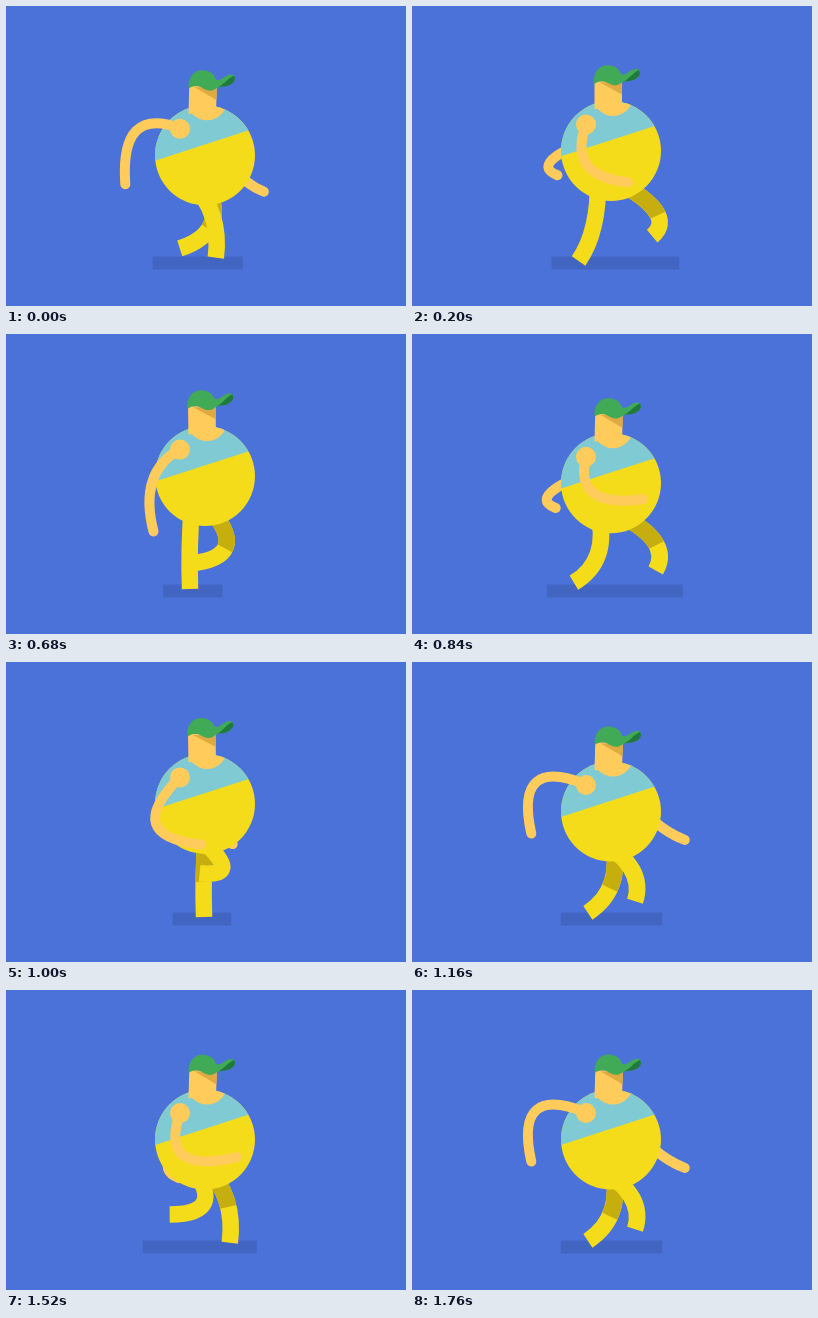
Write an HTML page with a canvas that moves like this. It is 400 px wide and 300 px high and loops after 1800 ms.

```html
<!DOCTYPE html>
<html lang="en">
<head>
<meta charset="utf-8">
<title>Runner</title>
<style>
html, body { margin: 0; width: 100%; height: 100%; overflow: hidden; background: #4b72d8; }
canvas { display: block; width: 400px; height: 300px; }
</style>
</head>
<body>
<canvas id="stage" width="400" height="300"></canvas>
<script>
const ctx = document.getElementById('stage').getContext('2d');
const CYCLE = 600, STEP = 40, GROUND = 255;
const SKY = '#4b72d8', SHADOW = '#4165c1', YELLOW = '#f5dc1a', OCHRE = '#c5ae0e',
  SHIRT = '#80cad3', SKIN = '#ffcc5c', SHADE = '#e0aa43', CAP = '#40aa56', CAP_DARK = '#1f7a3c';

// 1 at the peak time, once or several times per cycle
const beat = (t, peak, times = 1) => Math.cos(2 * Math.PI * times * (t - peak) / CYCLE);

const bodyHeight = t => 145.4 + 5.1 * beat(t, 280, 2) + 0.8 * beat(t, 340);

// Limbs are quadratic curves: root, bend, end
function leg(t, hipX, hipY, lift) {
  const x = hipX - 186;
  return [
    [hipX, hipY],
    [x + 215 + 37 * beat(t, 450) + 5 * beat(t, 530, 2), 216 + 11 * beat(t, 250)],
    [x + 190 + 33 * beat(t, 530) + 8 * beat(t, 195, 2),
      Math.min(GROUND, GROUND - lift * (0.47 - beat(t, 115)))]
  ];
}

function nearArm(t, y) {
  return [
    [174, y - 27],
    [128 + 33 * beat(t, 220) + 8 * beat(t, 10, 2), 148 + 43 * beat(t, 280) + 13 * beat(t, 100, 2)],
    [177 + 59 * beat(t, 280), 179 + 9 * beat(t, 60) + 12 * beat(t, 110, 2)]
  ];
}

function farArm(t, y) {
  const handX = 210 + 67 * beat(t, 526), handY = 179 + 10 * beat(t, 40, 2);
  return [[215, y - 25], [handX - 36, handY - 14], [handX, handY]];
}

function limb([root, bend, end], color, width, cap = 'butt') {
  ctx.beginPath();
  ctx.moveTo(...root);
  ctx.quadraticCurveTo(...bend, ...end);
  ctx.strokeStyle = color;
  ctx.lineWidth = width;
  ctx.lineCap = cap;
  ctx.stroke();
}

// First part of a limb, up to u
function upper([root, bend, end], u) {
  const mix = (p, q) => p.map((v, i) => v + (q[i] - v) * u);
  const a = mix(root, bend);
  return [root, a, mix(a, mix(bend, end))];
}

function disc(x, y, r, color) {
  ctx.beginPath();
  ctx.arc(x, y, r, 0, 7);
  ctx.fillStyle = color;
  ctx.fill();
}

function shape(path, color) {
  ctx.fillStyle = color;
  ctx.fill(new Path2D(path));
}

// Torso and head are drawn around the body centre
function torso() {
  ctx.save();
  disc(0, 0, 50, YELLOW);
  ctx.clip();
  shape('M-51 5.7 L51 -27.3 V-51 H-51Z', SHIRT);
  disc(2, -55, 20, SKIN);
  ctx.restore();
}

function head(tilt) {
  ctx.save();
  ctx.translate(-1, -42 + tilt * 25);
  ctx.rotate(tilt);
  ctx.translate(1, 42);
  shape('M-17 -70 H10.5 L11 -42 H-16.5Z', SKIN);
  shape('M-12 -69 L10.7 -69 V-57Z', SHADE);
  shape('M-17.5 -67 C-19 -78 -13 -86 -4 -86 C3 -86 7 -83 9.5 -77.5 ' +
    'C15 -75 18 -83 25 -83 C29 -83 29 -77 26.5 -75 C21 -69.5 15 -72.5 9 -68 ' +
    'C4 -64 -1 -67 -5 -69 C-9 -71 -14 -70 -17.5 -67Z', CAP);
  shape('M11 -69.5 C17 -72 20 -78 27 -82 C29 -80 28.5 -76.5 26.5 -75 ' +
    'C21 -69.5 15 -71.5 11 -69.5Z', CAP_DARK);
  ctx.restore();
}

function draw(t) {
  const y = bodyHeight(t);
  const nearLeg = leg(t, 186, y + 28, 30), farLeg = leg(t - 320, 200, y + 28, 20);
  const nearX = nearLeg[2][0], farX = farLeg[2][0];

  ctx.fillStyle = SKY;
  ctx.fillRect(0, 0, 400, 300);
  ctx.fillStyle = SHADOW;
  ctx.fillRect(Math.min(nearX, farX) - 27, 250.5, Math.abs(nearX - farX) + 54, 13);

  limb(farArm(t, y), SKIN, 10, 'round');
  limb(farLeg, YELLOW, 16.5);
  limb(upper(farLeg, 0.58), OCHRE, 16.5);
  limb(nearLeg, YELLOW, 16.5);

  ctx.save();
  ctx.translate(199, y);
  torso();
  head((y - 142) * 0.006);
  ctx.restore();

  limb(nearArm(t, y), SKIN, 10, 'round');
  disc(174, y - 26.5, 10, SKIN);
}

function tick() {
  const t = performance.now() % CYCLE;
  draw(Math.floor(t / STEP) * STEP);
  requestAnimationFrame(tick);
}
tick();
</script>
</body>
</html>
```
